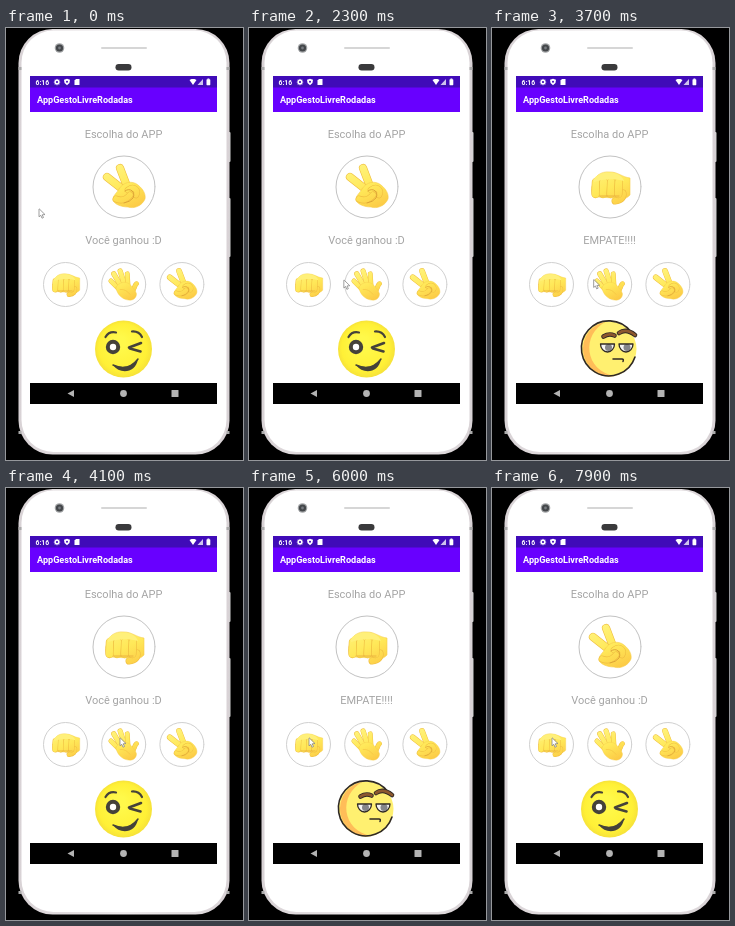
Write an HTML page with a canvas that moves like this. It is 237 px wide and 432 px high and loops after 8 s.

```html
<!DOCTYPE html>
<html lang="pt">
<head>
<meta charset="utf-8">
<style>
html, body { margin: 0; width: 100%; height: 100%; overflow: hidden; background: #000; }
canvas { display: block; width: 237px; height: 432px; }
</style>
</head>
<body>
<canvas id="stage"></canvas>
<script>
const W = 237, H = 432, LOOP = 8000, STEP = 100;
const canvas = document.getElementById('stage');
const ctx = canvas.getContext('2d');
const ratio = window.devicePixelRatio || 1;
canvas.width = W * ratio;
canvas.height = H * ratio;

// Each round: start time, the app's hand, result
const rounds = [
  [0, 'scissors', 'win'], [2500, 'rock', 'tie'], [4100, 'rock', 'win'],
  [5900, 'rock', 'tie'], [7500, 'scissors', 'win']
];

// Pointer visits: stops of [time, x, y]
const visits = [
  [[0, 33, 181], [600, 15, 186], [700, 15, 186], [800, 12, 188], [1300, 222, 215]],
  [[1800, 184, 238], [2400, 77, 255], [3100, 77, 255], [4000, 114, 250],
   [5300, 114, 250], [5500, 88, 257], [5700, 60, 250], [8000, 60, 250]]
];

function rect(x, y, w, h, fill, r = 0) {
  ctx.beginPath();
  ctx.roundRect(x, y, w, h, r);
  ctx.fillStyle = fill;
  ctx.fill();
}

function disc(x, y, r, fill) {
  ctx.beginPath();
  ctx.arc(x, y, r, 0, Math.PI * 2);
  ctx.fillStyle = fill;
  ctx.fill();
}

function ring(x, y, r, color, width = 1) {
  ctx.beginPath();
  ctx.arc(x, y, r, 0, Math.PI * 2);
  ctx.strokeStyle = color;
  ctx.lineWidth = width;
  ctx.stroke();
}

function polygon(points, fill) {
  ctx.beginPath();
  points.forEach(([x, y]) => ctx.lineTo(x, y));
  ctx.closePath();
  ctx.fillStyle = fill;
  ctx.fill();
}

function fillPath(path, color) {
  ctx.fillStyle = color;
  ctx.fill(new Path2D(path));
}

function stroke(path, color, width) {
  ctx.lineCap = ctx.lineJoin = 'round';
  ctx.strokeStyle = color;
  ctx.lineWidth = width;
  ctx.stroke(new Path2D(path));
}

function text(value, x, y, size, color, weight = 400, align = 'left') {
  ctx.font = `${weight} ${size}px Roboto, sans-serif`;
  ctx.textAlign = align;
  ctx.fillStyle = color;
  ctx.fillText(value, x, y);
}

function linear(x0, y0, x1, y1, ...colors) {
  const g = ctx.createLinearGradient(x0, y0, x1, y1);
  colors.forEach((c, i) => g.addColorStop(i / (colors.length - 1), c));
  return g;
}

const skin = () => linear(-10, -20, 10, 22, '#fff27a', '#ffe858', '#fcc945');

// A rounded finger with a soft darker rim
function finger(path, width) {
  stroke(path, '#efbd40', width);
  stroke(path, skin(), width - 1.2);
}

function palm(path) {
  fillPath(path, skin());
  stroke(path, '#f6cd4c', 0.6);
}

const hands = {
  rock() {
    palm('M-18 0 C-17 -11 -9 -16 0 -15 C8 -15 12 -10 20 -9 L20 8 C15 13 10 13 5 11 L-13 10 C-18 9 -19 4 -18 0Z');
    finger('M13 6 Q14 13 5 14', 7);
    for (let i = 0; i < 4; i++) finger(`M${-14 + i * 7.6} -5 L${-14.5 + i * 7.6} 7`, 8.4);
    fillPath('M-16 -8 C-12 -16 10 -18 14 -6 C5 -9 -8 -8 -16 -5Z', '#fff07a');
    stroke('M-10 9 H9', '#e5a93a', 0.8);
  },
  paper() {
    finger('M-6 7 L-18 -5', 7);
    finger('M-4 2 L-14 -15', 7.4);
    finger('M1 0 L-5 -19', 7.4);
    finger('M6 2 L5 -15', 7);
    finger('M10 12 C16 8 14 2 18 -1', 7);
    palm('M-11 4 C-7 -3 1 -5 8 -1 C12 4 17 8 18 13 C18 19 13 23 7 22 C-3 21 -10 13 -11 4Z');
    stroke('M-5 7 Q3 6 9 14', '#f5c443', 0.9);
  },
  scissors() {
    finger('M4 2 L-4 -19', 8.2);
    finger('M2 5 L-17 -10', 8.2);
    palm('M-5 2 C-1 -5 8 -7 14 -2 C19 2 22 7 21 12 C18 19 10 22 4 20 C-3 20 -10 17 -11 13 C-11 8 -7 6 -5 2Z');
    finger('M4 3 C10 -2 15 4 12 8', 6.5);
    finger('M-8 12 C-3 14 2 13 6 8', 6.8);
    stroke('M1 4 C6 0 12 5 9 11 Q6 15 0 16', '#dda437', 1);
  }
};

function handButton(name, x, y, r, rim) {
  disc(x, y, r, '#fff');
  ring(x, y, r, rim);
  ctx.save();
  ctx.translate(x, y);
  ctx.scale(r / 31, r / 31);
  hands[name]();
  ctx.restore();
}

function winkFace() {
  const glow = ctx.createRadialGradient(113, 314, 6, 117.5, 321, 28.5);
  glow.addColorStop(0, '#fff94a');
  glow.addColorStop(0.8, '#fff036');
  glow.addColorStop(1, '#f6e23a');
  const ink = '#45423a';
  disc(117.5, 321, 28.5, glow);
  disc(107, 319, 7.2, ink);
  disc(107, 319, 3.2, '#fff');
  stroke('M99.5 309 Q103 303 110 304.5', ink, 2.2);
  stroke('M126 303.5 Q133 303 136 309', ink, 2.2);
  stroke('M135 315 L123 319.5 M124 320.5 L134.5 323.5', ink, 2.6);
  fillPath('M107 337 C114 347 130 345 132 331 C126 339 117 341 107 337Z', ink);
  stroke('M107 337 Q122 344 132 331', ink, 1.5);
}

function boredFace() {
  const ink = '#2f2925';
  disc(117, 321, 27.5, '#fff070');
  fillPath('M114 293.7 A27.5 27.5 0 0 0 123 348 C92 343 89 306 114 293.7Z', '#ffbd58');
  stroke('M139 304 A27.5 27.5 0 1 0 143 329', ink, 1.6);
  for (const x of [115.5, 134]) {
    fillPath(`M${x - 7} 316 H${x + 7} A7 8 0 0 1 ${x - 7} 316Z`, '#f4f4f4');
    disc(x + 1, 319.5, 3.5, '#85868a');
    stroke(`M${x - 7} 316 H${x + 7} A7 8 0 0 1 ${x - 7} 316`, ink, 1.3);
  }
  for (const brow of ['M111.5 308.5 Q117 305 122.5 307.5', 'M127 305 Q134 300 143 307']) {
    stroke(brow, ink, 4.6);
    stroke(brow, '#8c582e', 2.8);
  }
  stroke('M121 331 H130 Q132 331 131 333.5', ink, 1.5);
}

function phone() {
  rect(220, 104, 4.5, 30, '#d2d2d2', 1);
  rect(220, 170, 4.5, 59, '#d2d2d2', 1);
  rect(12.5, 1, 211, 425.5, linear(12, 0, 224, 0, '#d8d2d5', '#eeeaec', '#d8d2d5'), 34);
  rect(15.5, 2.5, 205, 421.5, '#fff', 32);
  for (const y of [39, 403]) {
    rect(12.5, y, 3, 3, '#aaa');
    rect(220.5, y, 3, 3, '#aaa');
  }
  disc(53.5, 20, 4.8, '#a2a4a6');
  disc(53.5, 20, 3.6, '#44474a');
  disc(53.5, 20, 1.4, '#777b80');
  rect(95, 19, 46, 2, '#d6d6d6', 1);
  rect(109.5, 36, 16, 6.5, '#3a3a3c', 3.2);
}

function statusBar() {
  rect(24, 48, 187, 11.5, '#400bb8');
  text('6:16', 29.5, 56.5, 6.8, '#fff', 700);
  ring(51, 54, 1.8, '#fff', 1.4);
  for (let i = 0; i < 8; i++) {
    const a = i * Math.PI / 4;
    disc(51 + 2.7 * Math.cos(a), 54 + 2.7 * Math.sin(a), 0.6, '#fff');
  }
  polygon([[58, 51.7], [61, 50.7], [64, 51.7], [63.5, 55], [61, 57.3], [58.5, 55]], '#fff');
  disc(61, 53.7, 1, '#400bb8');
  polygon([[70, 51], [73.5, 51], [73.5, 57], [68.5, 57], [68.5, 52.5]], '#fff');
  polygon([[183.5, 52], [185.5, 51], [188.5, 51], [190.5, 52], [187, 57]], '#fff');
  polygon([[197, 51], [197, 57], [191.5, 57]], '#cfc2ee');
  rect(200.5, 51.3, 3.8, 5.9, '#fff', 0.6);
  rect(201.5, 50.5, 1.8, 1.2, '#fff');
}

function navBar() {
  const icon = '#b4b4b4';
  rect(24, 355, 187, 21, '#000');
  polygon([[61.5, 365.5], [68, 362], [68, 369]], icon);
  disc(117.5, 365.5, 3.4, icon);
  rect(165.5, 362, 7, 7, icon, 0.5);
}

function pointerAt(t) {
  const stops = visits.find(v => t >= v[0][0] && t < v[v.length - 1][0]);
  if (!stops) return null;
  const i = stops.findIndex(s => s[0] > t);
  const [t0, x0, y0] = stops[i - 1], [t1, x1, y1] = stops[i];
  const p = (t - t0) / (t1 - t0);
  return [x0 + (x1 - x0) * p, y0 + (y1 - y0) * p];
}

function pointer([x, y]) {
  const arrow = [[0, 0], [0, 7.8], [1.8, 6.3], [3, 9.2], [4.5, 8.5], [3.2, 5.8], [5.6, 5.6]]
    .map(([dx, dy]) => [x + dx, y + dy]);
  polygon(arrow, '#fff');
  ctx.strokeStyle = '#868686';
  ctx.lineWidth = 0.8;
  ctx.stroke();
}

function draw(t) {
  const [, hand, result] = rounds.findLast(r => r[0] <= t);
  const label = value => [value, '#a6a6a6'];
  ctx.setTransform(ratio, 0, 0, ratio, 0, 0);
  rect(0, 0, W, H, '#000');
  phone();
  rect(24, 48, 187, 328, '#fff');
  rect(24, 59, 187, 25, '#6800ff');
  statusBar();
  text('AppGestoLivreRodadas', 31, 75.3, 9.1, '#fff', 700);
  text('Escolha do APP', 117.5, 110, 11, '#a4a4a4', 400, 'center');
  handButton(hand, 118, 159, 31, '#c2c2c2');
  text(result === 'win' ? 'Você ganhou :D' : 'EMPATE!!!!', 117.5, 216, 11, '#a4a4a4', 400, 'center');
  ['rock', 'paper', 'scissors'].forEach((name, i) =>
    handButton(name, 59.5 + i * 58.2, 256.5, 22, '#d0d0d0'));
  if (result === 'win') winkFace(); else boredFace();
  navBar();
  const spot = pointerAt(t);
  if (spot) pointer(spot);
}

function tick() {
  const t = performance.now() % LOOP;
  draw(Math.floor(t / STEP) * STEP);
  requestAnimationFrame(tick);
}
tick();
</script>
</body>
</html>
```
